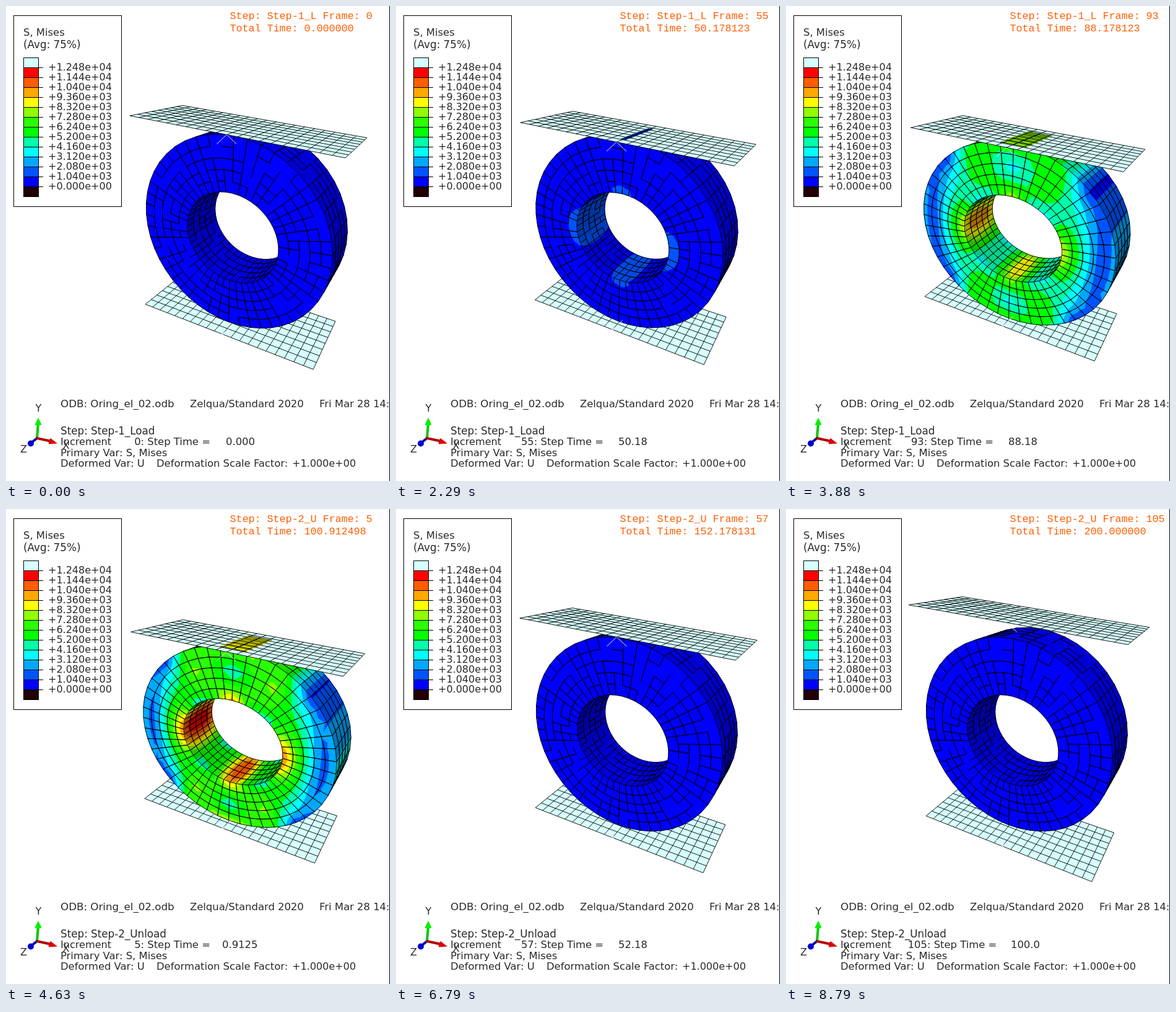
Recreate the animation shown at these times as an HTML page with a canvas. Size 620 by 766 pixels, loop 8.83 s.

```html
<!DOCTYPE html>
<html lang="en">
<head>
<meta charset="utf-8">
<title>Ring compression</title>
<style>
html, body { margin: 0; width: 100%; height: 100%; overflow: hidden; background: #fff; }
canvas, svg { position: absolute; left: 0; top: 0; }
text { font: 16.4px "DejaVu Sans", sans-serif; white-space: pre; fill: #2a2a2a; }
.mono { font: 16.67px "Liberation Mono", monospace; fill: #ff5d00; }
.legend { font-size: 16px; }
</style>
</head>
<body>
<canvas id="stage" width="620" height="766"></canvas>
<svg width="620" height="766" viewBox="0 0 620 766">
  <g id="legend">
    <rect x="12.5" y="15.5" width="174" height="308" fill="none" stroke="#000"/>
    <text x="28" y="48">S, Mises</text>
    <text x="28" y="68" style="font-size:16.8px">(Avg: 75%)</text>
  </g>
  <text class="mono" x="361.5" y="21" id="frameLabel"></text>
  <text class="mono" x="361.5" y="41" id="totalLabel"></text>
  <text x="88" y="647" style="font-size:16.7px">ODB: Oring_el_02.odb</text>
  <text x="297" y="647">Zelqua/Standard 2020</text>
  <text x="506" y="647">Fri Mar 28 14:</text>
  <text x="88" y="691" style="font-size:16.75px" id="stepLabel"></text>
  <text x="88" y="708" style="font-size:16.1px">Increment</text>
  <text x="268.5" y="708" text-anchor="middle" id="incLabel"></text>
  <text y="708" id="timeLabel"></text>
  <text x="88" y="726">Primary Var: S, Mises</text>
  <text x="88" y="743">Deformed Var: U</text>
  <text x="243" y="743">Deformation Scale Factor:</text>
  <text x="462" y="743" class="legend">+1.000e+00</text>
  <rect x="619" y="0" width="1" height="766"/>
  <g stroke-width="4" stroke-linecap="round">
    <path d="M50 697L52 673" stroke="#00c800"/>
    <path d="M52 664L46.500 675.500Q52 678 57.500 675Z" fill="#00f000"/>
    <path d="M50 697L40 705" stroke="#0000b0"/>
    <path d="M50 697L71 701.500" stroke="#b00000"/>
    <path d="M83 705.500L69 706.500Q68 701 72 697Z" fill="#e00000"/>
    <circle cx="40" cy="705.500" r="5" fill="#0000d0"/>
  </g>
  <text x="47.500" y="654" class="legend">Y</text>
  <text x="91.500" y="714" class="legend">X</text>
  <text x="23" y="720" class="legend">Z</text>
</svg>
<script>
const ctx = document.getElementById('stage').getContext('2d');
const el = id => document.getElementById(id);
const LOOP = 8830, STEP_FRAMES = 106, BAND = 1040;
const SECTORS = 48, LAYERS = 5, FRONT = -0.154, BACK = -0.815;
const PLATE_COLS = 20, PLATE_ROWS = 8;
const PLATE = '#d7ffff';
const COLORS = ['#0000ff', '#0054ff', '#00a8ff', '#00ffff', '#00ffa8', '#00ff00',
  '#2aff00', '#91ff00', '#ffff00', '#ffa900', '#ff5d00', '#ff0000'];

function buildLegend() {
  const boxes = [PLATE, ...[...COLORS].reverse(), '#200000'];
  let out = '';
  boxes.forEach((color, i) => {
    const y = 83 + 16 * i;
    out += `<rect x="28.5" y="${y + .5}" width="24" height="16" fill="${color}" stroke="#000"/>`;
    if (i === 13) return;
    const value = ((12 - i) * BAND).toExponential(3).replace(/e\+(\d)/, 'e+0$1');
    out += `<path d="M52 ${y + 16.5}h8" stroke="#000"/>` +
      `<text class="legend" x="68" y="${y + 21}">+${value}</text>`;
  });
  el('legend').insertAdjacentHTML('beforeend', out);
}

// Perspective camera: x along the plates, y up, z along the ring axis.
function project(x, y, z) {
  const w = 1 - .0897 * x - .1205 * y - .1837 * z;
  return [(352.55 + 119.5 * x - 39.23 * y - 134.7 * z) / w,
          (387.8 + 10.98 * x - 205.3 * y - 13.4 * z) / w];
}

const mix = (a, b, t) => a + (b - a) * t;
const depth = j => mix(FRONT, BACK, j / LAYERS);

function smooth(t) {
  t = Math.max(0, Math.min(1, t));
  return t * t * (3 - 2 * t);
}

function hash(i, j, k) {
  const v = Math.sin((i % SECTORS) * 12.9898 + j * 78.233 + k * 37.719) * 43758.5453;
  return v - Math.floor(v);
}

function ringPoint(angle, r, z, load) {
  const rx = mix(.495 + .045 * load, 1 + .04 * load, r);
  const ry = mix(.45 - .03 * load, .95 - .07 * load, r);
  return project(rx * Math.cos(angle), .02 - .01 * load + ry * Math.sin(angle), z);
}

// Stress at full load, r = 0 on the bore and 1 on the rim:
// bending at the sides and poles, shear in the flanks beside the poles.
function stress(angle, r, z) {
  const c = Math.cos(2 * angle);
  const side = Math.hypot(10800 - 13800 * r, 1500);
  const pole = Math.hypot(9000 - 16000 * r, 4700);
  const diagonal = 4800 + 7000 * r - 10800 * r * r;
  const flank = 7900 - 2000 * (2 * r - 1.2) ** 2;
  const inside = Math.sqrt(Math.max(0, Math.sin(Math.PI * (z - FRONT) / (BACK - FRONT))));
  const plane = c > 0 ? mix(diagonal, side, c ** 1.2)
    : mix(mix(diagonal, flank, smooth(-c / .6)), pole, c ** 6);
  return plane * (1 + .16 * inside * (1 - r));
}

function clipAbove(poly, level) {
  const out = [];
  poly.forEach((a, i) => {
    const b = poly[(i + 1) % poly.length];
    if (a[2] >= level) out.push(a);
    if ((a[2] >= level) !== (b[2] >= level)) {
      const t = (level - a[2]) / (b[2] - a[2]);
      out.push([mix(a[0], b[0], t), mix(a[1], b[1], t), level]);
    }
  });
  return out;
}

function addPoly(path, poly) {
  poly.forEach((p, i) => i ? path.lineTo(p[0], p[1]) : path.moveTo(p[0], p[1]));
  path.closePath();
}

const bandOf = v => Math.max(0, Math.min(11, Math.floor(v / BAND)));

function addBands(paths, tri) {
  const values = tri.map(p => p[2]);
  const low = bandOf(Math.min(...values)), high = bandOf(Math.max(...values));
  for (let k = low; k <= high; k++) {
    const poly = k === low ? tri : clipAbove(tri, k * BAND);
    if (poly.length > 2) addPoly(paths[k], poly);
  }
}

function facing(q) {
  return q.reduce((sum, p, i) => {
    const n = q[(i + 1) % 4];
    return sum + p[0] * n[1] - n[0] * p[1];
  }, 0) > 0;
}

// place(j) gives [r, z] of a mesh line; shade(angle) darkens each strip.
function drawSurface(place, load, shade) {
  const grid = [];
  for (let i = 0; i <= SECTORS; i++) {
    const angle = 2 * Math.PI * i / SECTORS;
    grid.push(Array.from({ length: LAYERS + 1 }, (_, j) => {
      const [r, z] = place(j);
      return [...ringPoint(angle, r, z, load), stress(angle, r, z) * load];
    }));
  }
  const bands = COLORS.map(() => new Path2D()), lines = new Path2D(), strips = [];
  const gaps = .2 * Math.max(0, 1 - 2.2 * load);
  const edge = (i, j, di, dj) => {
    const border = di && (j === 0 || j === LAYERS);
    if (!border && hash(i, j, di) < gaps) return;
    addLine(lines, grid[i][j].slice(0, 2), grid[i + di][j + dj].slice(0, 2));
  };
  for (let i = 0; i < SECTORS; i++) {
    const strip = new Path2D();
    for (let j = 0; j < LAYERS; j++) {
      const quad = [grid[i][j], grid[i + 1][j], grid[i + 1][j + 1], grid[i][j + 1]];
      if (!facing(quad)) continue;
      addBands(bands, [quad[0], quad[1], quad[2]]);
      addBands(bands, [quad[0], quad[2], quad[3]]);
      addPoly(strip, quad);
      edge(i, j, 1, 0);
      edge(i, j + 1, 1, 0);
      edge(i, j, 0, 1);
      edge(i + 1, j, 0, 1);
    }
    strips.push(strip);
  }
  bands.forEach((path, k) => {
    ctx.fillStyle = ctx.strokeStyle = COLORS[k];
    ctx.lineWidth = .7;
    ctx.fill(path);
    ctx.stroke(path);
  });
  if (shade) strips.forEach((path, i) => {
    ctx.fillStyle = `rgba(0,0,0,${shade(2 * Math.PI * (i + .5) / SECTORS)})`;
    ctx.fill(path);
  });
  strokeLines(lines);
}

function strokeLines(path, color = '#000') {
  ctx.strokeStyle = color;
  ctx.lineWidth = .9;
  ctx.stroke(path);
}

function addLine(path, a, b) {
  path.moveTo(...a);
  path.lineTo(...b);
}

function fillRect3d(x, y, near, far, color) {
  const path = new Path2D();
  addPoly(path, [project(-x, y, near), project(x, y, near), project(x, y, far), project(-x, y, far)]);
  ctx.fillStyle = color;
  ctx.fill(path);
}

function drawPlate(y, load) {
  fillRect3d(1, y, 0, -1, PLATE);
  const lines = new Path2D();
  if (load > 0) {
    const half = .13 * Math.min(1, load * 1.7);
    fillRect3d(half, y, FRONT, BACK, COLORS[bandOf(8900 * load ** .75)]);
    fillRect3d(half, y, FRONT, BACK, 'rgba(0,0,0,.1)');
    for (let j = 0; j <= LAYERS; j++)
      addLine(lines, project(-half, y, depth(j)), project(half, y, depth(j)));
    for (let x = 0; x < half; x += 2 * Math.PI / SECTORS) {
      addLine(lines, project(x, y, FRONT), project(x, y, BACK));
      addLine(lines, project(-x, y, FRONT), project(-x, y, BACK));
    }
  }
  for (let i = 0; i <= PLATE_COLS; i++) {
    const x = 2 * i / PLATE_COLS - 1;
    addLine(lines, project(x, y, 0), project(x, y, -1));
  }
  for (let j = 0; j <= PLATE_ROWS; j++) {
    const z = -j / PLATE_ROWS;
    addLine(lines, project(-1, y, z), project(1, y, z));
  }
  strokeLines(lines);
}

function drawMarker(y) {
  const [u, v] = project(0, y, 0), path = new Path2D();
  addLine(path, [u - 16, v - 15], [u + 16, v + 15]);
  addLine(path, [u - 16, v + 15], [u + 16, v - 15]);
  strokeLines(path, '#fff');
}

function drawModel(travel) {
  const y = 1 - .00116 * travel, load = Math.max(0, (travel - 43) / 57);
  ctx.clearRect(0, 0, 620, 766);
  drawPlate(-y, 0);
  const shade = up => .38 - .26 * Math.max(0, up);
  drawSurface(j => [0, depth(LAYERS - j)], load, a => shade(-Math.sin(a)));
  drawSurface(j => [1, depth(j)], load, a => shade(Math.sin(a)));
  drawSurface(j => [j / LAYERS, FRONT], load);
  drawMarker(-y);
  drawMarker(y);
  drawPlate(y, load);
}

// Solver increments grow by half until they reach one second.
function stepTime(frame) {
  let time = 0, inc = .1;
  for (let i = 1; i <= frame; i++) {
    if (i > 2) inc = Math.min(1, inc * 1.5);
    time += inc;
  }
  return Math.min(100, time);
}

function drawLabels(step, frame, time) {
  const name = step === 1 ? 'Load' : 'Unload';
  const total = Math.fround((step - 1) * 100 + time).toFixed(6);
  const value = time ? time.toPrecision(4) : '0.000';
  el('frameLabel').textContent = `Step: Step-${step}_${name[0]} Frame: ${frame}`;
  el('totalLabel').textContent = `Total Time: ${total}`;
  el('stepLabel').textContent = `Step: Step-${step}_${name}`;
  el('incLabel').textContent = `${frame}: Step Time =`;
  el('timeLabel').textContent = value;
  el('timeLabel').setAttribute('x', 351 + 4 * String(frame).length - (value.length > 5 ? 6 : 0));
}

let shown = -1;
function render(now) {
  // 24 pictures a second, each starting on a multiple of 10 ms
  const tick = Math.floor((now % LOOP) / 10) * 10;
  const index = Math.min(2 * STEP_FRAMES - 1, Math.ceil((tick + 5) * .024) - 1);
  if (index !== shown) {
    shown = index;
    const step = index < STEP_FRAMES ? 1 : 2, frame = index % STEP_FRAMES;
    const time = stepTime(frame);
    drawModel(step === 1 ? time : 100 - 2 * time);
    drawLabels(step, frame, time);
  }
}

buildLegend();
const start = performance.now();
function loop() {
  render(performance.now() - start);
  requestAnimationFrame(loop);
}
loop();
</script>
</body>
</html>
```
